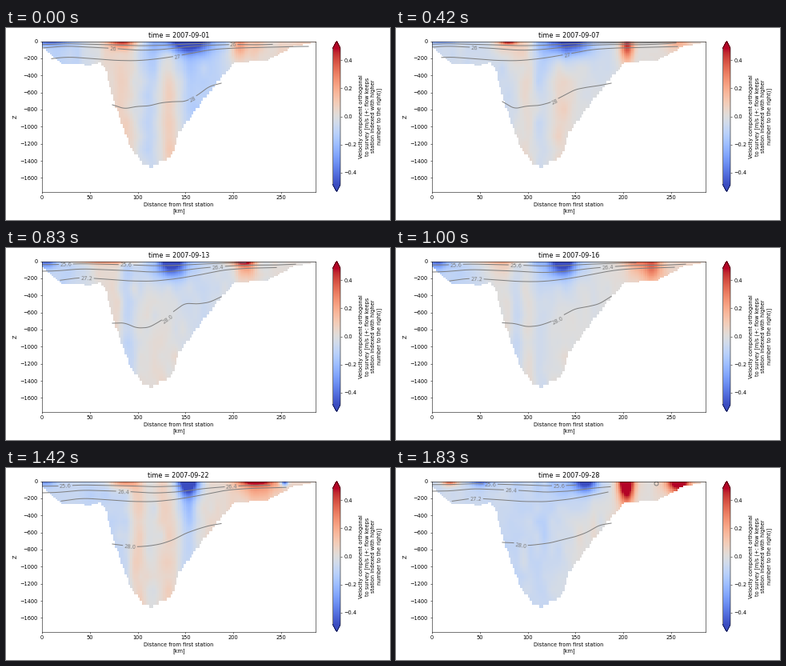
A matplotlib script that plays this animation: 480x240 px, repeating every 2.01 s.

```python
import numpy as np
import matplotlib.pyplot as plt
from matplotlib.animation import FuncAnimation

W, H = 480, 240
LEFT, RIGHT, TOP, BOTTOM = 44.5, 387, 16.5, 204.5
HOLDS = [170, 250, 160, 250, 170, 170, 250, 160, 250, 180]
STEP = 10
VMAX = 0.4865
GRAY = "#7f7f7f"

plt.rcParams["font.family"] = "DejaVu Sans"


def km(x):
    return (np.asarray(x) - 45.1) / 1.194


def depth(y):
    return (TOP - np.asarray(y)) / 0.1068


def soften(values, n):
    """Moving average that keeps the slope at both ends."""
    padded = np.pad(values, n // 2, mode="reflect", reflect_type="odd")
    return np.convolve(padded, np.ones(n) / n, "valid")


# Section grid in stage pixels, cut off at the sea bed
NX, NY = 143, 90
gx = np.linspace(LEFT, RIGHT, 2 * NX + 1)[1::2]
gy = np.linspace(TOP, BOTTOM, 2 * NY + 1)[1::2]
X, Y = np.meshgrid(gx, gy)

bed_x = [45, 70, 105, 118, 124, 135, 155, 170, 180, 200, 208, 216, 245,
         272, 285, 325, 358, 386]
bed_y = [25, 46, 47, 44, 53, 95, 150, 171, 175, 166, 157, 131, 92,
         58, 44, 41, 24, 18.5]
bed = np.interp(gx, bed_x, bed_y)
bed = np.where(bed > 55, TOP + np.round((bed - TOP) / 4.2) * 4.2, bed)
land = Y > bed

COLUMNS = [80, 138, 150, 162, 180, 203, 228, 246, 360]
DEEP_X = np.linspace(133, 269, 10)
UPPER_X = np.linspace(45, 375, 12)
MIDDLE = [40, 36, 38, 40.5, 41, 38, 33, 27, 25, 24.5, 23.5, 23]
SHALLOW = np.array([25, 22.5, 24, 25.5, 28, 27, 23.5, 21.5, 20.5, 21, 20, 18])
UPPER = [MIDDLE, SHALLOW, (SHALLOW + TOP) / 2]

rng = np.random.default_rng(7)


def texture():
    """Faint streaks that follow the water column."""
    noise = rng.normal(size=(12, 40))
    rows = np.array([np.interp(gx, np.linspace(LEFT, RIGHT, 40), r)
                     for r in noise])
    cols = [np.interp(gy, np.linspace(TOP, BOTTOM, 12), c) for c in rows.T]
    return 0.018 * np.array(cols).T


def make_field(columns, blobs):
    v = texture() + soften(np.interp(gx, COLUMNS, columns), 5)
    for x, w, h, amp in blobs:
        v += amp * np.exp(-((X - x) / w) ** 2 - ((Y - TOP) / h) ** 2)
    return v


def make_lines(shift, deep, upper):
    xs = np.linspace(DEEP_X[0], DEEP_X[-1], 300)
    lines = [(xs, soften(np.interp(xs, DEEP_X, deep), 25))]
    starts = [max(57, 57 + 0.6 * shift), 46, 46]
    for start, (end, drop), shape in zip(starts, upper, UPPER):
        xs = np.linspace(start, end, 300)
        ys = soften(np.interp(xs - shift, UPPER_X, shape), 25)
        lines.append((xs, ys + drop * (375 - xs) / 330))
    return np.array(lines)


def state(columns, blobs, shift, deep, upper, labels):
    """Blobs: x, width, reach, speed.  Upper lines: end, extra depth."""
    return make_field(columns, blobs), make_lines(shift, deep, upper), labels


def between(a, b):
    return (a[0] + b[0]) / 2, (a[1] + b[1]) / 2, a[2]


day01 = state(
    [-.1, .06, .07, 0, -.11, .11, -.12, -.11, .07],
    [(55, 22, 6, -.35), (145, 19, 9, .4), (225, 30, 14, -.5),
     (205, 42, 36, -.12), (291, 10, 26, .3), (312, 12, 24, .15)],
    0, [96, 101, 98, 97.5, 93.5, 92, 92, 84.5, 73, 69],
    [(378, 0), (333, 0), (255, 0)],
    [("28", 233), ("27", 214), ("26", 134), ("26", 284)])

day07 = state(
    [-.05, -.07, -.01, .06, -.08, .06, 0, -.04, .04],
    [(55, 22, 4, -.3), (140, 11, 5, .5), (138, 22, 24, .15),
     (215, 28, 15, -.45), (208, 30, 36, -.15), (288, 9, 24, .5),
     (350, 14, 10, .17)],
    -12, [92, 101, 97.5, 97, 93, 85, 77, 74, 72, 69],
    [(352, 0), (350, 0), (350, 0)],
    [("28", 198), ("27", 214), ("26", 98)])

day10 = state(
    [-.05, -.02, -.11, .04, .03, .04, -.05, .02, 0],
    [(130, 30, 4, .3), (210, 22, 15, -.5), (206, 28, 34, -.17),
     (291, 8, 24, .55), (280, 16, 30, .13), (360, 25, 5, .16)],
    0, [93, 97, 103, 98, 96, 87, 72, 68.5, 70, 65],
    [(344, -1), (344, 0), (280, 0)],
    [("28", 216), ("25", 101), ("26", 252)])

day13 = state(
    [-.09, .05, -.12, -.01, .01, .02, -.03, -.06, .02],
    [(50, 14, 9, -.33), (120, 45, 4, .3), (206, 19, 18, -.5),
     (200, 36, 36, -.14), (293, 16, 6, .4), (300, 11, 24, .3)],
    18, [94, 93.5, 100, 99.5, 91, 80, 69, 70, 68, 61],
    [(338, 1), (362, 4), (300, 0)],
    [("28.0", 202), ("27.2", 101), ("25.6", 75), ("25.6", 150),
     ("26.4", 265)])

day19 = state(
    [-.11, -.02, -.07, .08, -.13, 0, .03, .02, .11],
    [(53, 15, 11, -.33), (135, 20, 22, .18), (172, 12, 7, -.28),
     (210, 17, 16, -.5), (207, 26, 38, -.15), (319, 12, 24, .7)],
    15, [93, 95, 97, 95, 93.5, 88.5, 83, 77, 72, 60],
    [(358, 3), (362, 6), (300, 1)],
    [("28.0", 216), ("27.2", 345), ("26.4", 262)])

day22 = state(
    [-.08, -.09, -.07, .09, -.02, .08, -.1, .03, .03],
    [(50, 12, 7, -.25), (145, 17, 10, .35), (226, 15, 17, -.5),
     (228, 12, 55, -.15), (310, 20, 6, .4), (315, 28, 24, .25),
     (347, 5, 6, -.6)],
    20, [95, 97, 98.5, 97.5, 95, 90, 82, 76.5, 72, 69.5],
    [(350, 2), (330, 6), (218, 2)],
    [("28.0", 155), ("26.4", 147), ("25.6", 74), ("26.4", 282)])

day28 = state(
    [-.06, -.08, -.1, -.06, -.1, -.04, 0, 0, .04],
    [(67, 10, 6, .45), (105, 13, 7, -.33), (237, 14, 13, -.42),
     (222, 32, 24, -.2), (287, 10, 27, .75), (352, 14, 14, .7)],
    22, [93, 93.5, 97, 95.5, 93.5, 89.5, 86, 80.5, 71.5, 69],
    [(265, 2), (268, 4), (225, 0)],
    [("28.0", 156), ("27.2", 100), ("26.4", 144), ("25.6", 118),
     ("25.6", 204)])

states = [day01, between(day01, day07), day07, day10, day13,
          between(day13, day19), day19, day22, between(day22, day28), day28]

fig = plt.figure(figsize=(10, 5), dpi=48, facecolor="white")


def place(x0, x1):
    return [x0 / W, 1 - BOTTOM / H, (x1 - x0) / W, (BOTTOM - TOP) / H]


ax = fig.add_axes(place(LEFT, RIGHT))
box = (km(LEFT), km(RIGHT), depth(BOTTOM), depth(TOP))
fields = [np.ma.masked_where(land, s[0]) for s in states]
image = ax.imshow(fields[0], cmap="coolwarm", vmin=-VMAX, vmax=VMAX,
                  extent=box, aspect="auto", interpolation="nearest")
ax.set_xlim(box[:2])
ax.set_ylim(box[2:])
ax.set_xticks(range(0, 251, 50))
ax.set_yticks(range(0, -1601, -200))
ax.set_xlabel("Distance from first station\n[km]")
ax.set_ylabel("Z")
title = ax.set_title("time = 2007-09-01")

bar = fig.colorbar(image, cax=fig.add_axes(place(408.6, 418)), extend="both",
                   ticks=np.arange(-2, 3) / 5)
bar.set_label("Velocity component orthogonal\nto survey [m/s (+: flow keeps\n"
              "station indexed with higher\nnumber to the right)]")


def draw_contours(lines, labels):
    """Grey isolines, each broken where its label sits."""
    artists = []
    gaps = np.zeros((len(lines), lines.shape[2]), bool)
    for text, x in labels:
        level = 28 - int(float(text))
        xs, ys = lines[level]
        half = 9 if "." in text else 5.5
        y0, y, y1 = np.interp([x - half, x, x + half], xs, ys)
        angle = np.arctan2(y0 - y1, 2 * half)
        artists.append(ax.text(km(x), depth(y), text, color=GRAY,
                               rotation=np.degrees(angle), ha="center",
                               va="center_baseline", clip_on=True))
        gaps[level] |= np.abs(xs - x) < half * np.cos(angle)
    for (xs, ys), gap in zip(lines, gaps):
        artists += ax.plot(km(xs), depth(np.where(gap, np.nan, ys)),
                           color=GRAY, lw=1.5)
    return artists


contours = [draw_contours(s[1], s[2]) for s in states]
loop = ax.plot(km(325), depth(18.6), "o", ms=7.5, mfc="none", mec=GRAY,
               mew=1.5)
contours[-1] += loop
ends = np.cumsum(HOLDS) // STEP


def update(n):
    now = int(np.searchsorted(ends, n, side="right"))
    image.set_data(fields[now])
    title.set_text(f"time = 2007-09-{1 + 3 * now:02d}")
    for k, group in enumerate(contours):
        for artist in group:
            artist.set_visible(k == now)
    return []


anim = FuncAnimation(fig, update, frames=int(ends[-1]), interval=STEP,
                     init_func=lambda: update(0), repeat=True, repeat_delay=0)
plt.show()
```
